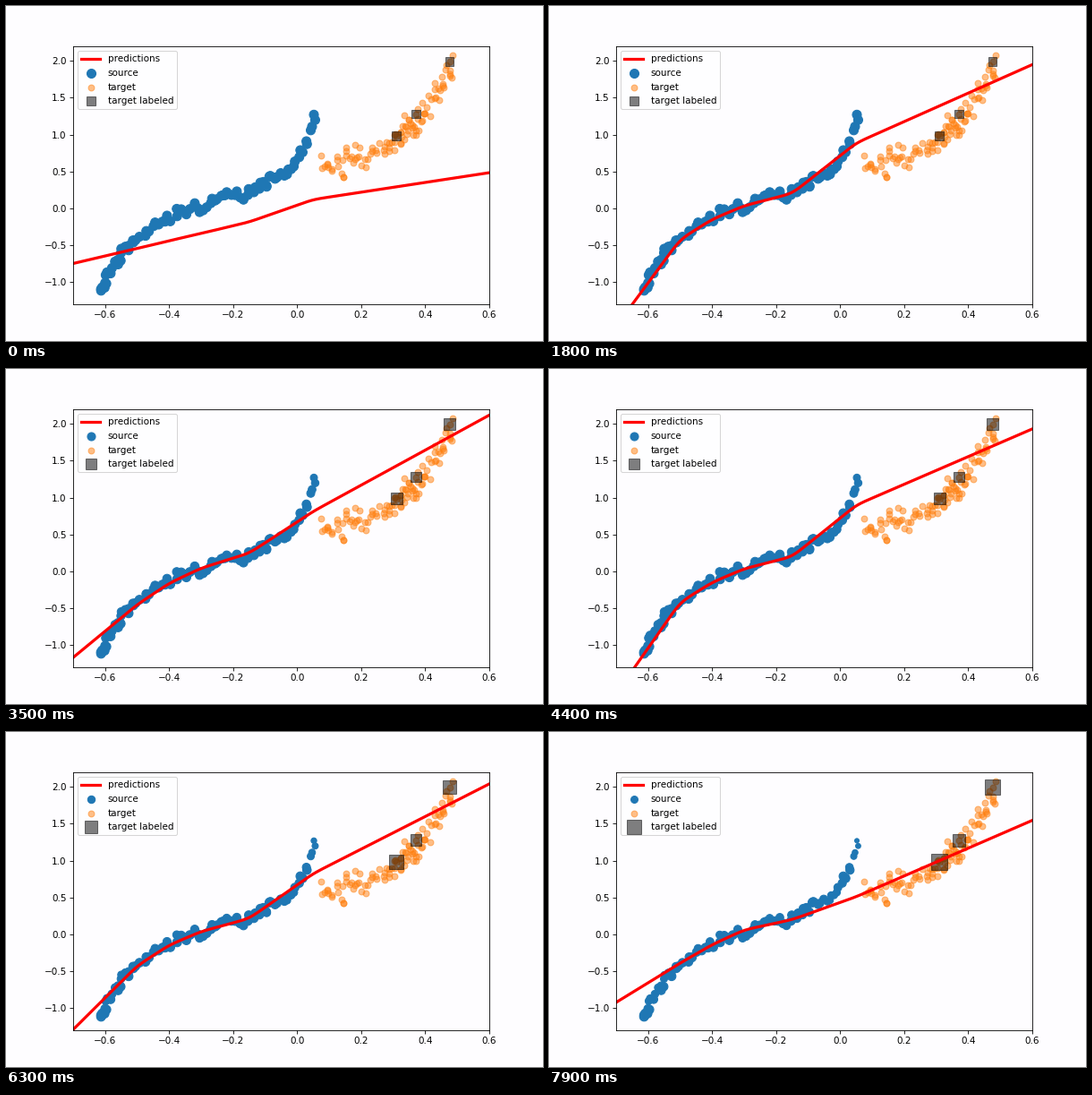
A matplotlib script for the animation above (8000 ms loop, 600 px wide and 374 px high).

```python
import numpy as np
import matplotlib.pyplot as plt
from matplotlib.animation import FuncAnimation

FRAMES, STAGE_LEN = 80, 25
PAPER = "#fefdff"
rng = np.random.default_rng(4)


def scatter_along(path, count, noise):
    """Points spread evenly over the sections of a path, with random offsets."""
    path = np.array(path)
    t = np.linspace(0, len(path) - 1, count)
    k = np.arange(len(path))
    points = np.column_stack([np.interp(t, k, col) for col in path.T])
    return points + rng.normal(0, 1, points.shape).clip(-1.8, 1.8) * noise


SOURCE = scatter_along(
    [(-.61, -1.11), (-.6, -1.07), (-.57, -.71), (-.54, -.57), (-.5, -.4), (-.44, -.25),
     (-.4, -.14), (-.34, -.01), (-.295, .01), (-.25, .13), (-.2, .18), (-.15, .19),
     (-.1, .35), (-.065, .42), (-.02, .53), (.02, .83), (.057, 1.24)],
    90, (.004, .04))

LABELED = np.array([(.310, .985), (.371, 1.28), (.476, 1.995)])
TARGET = np.vstack([LABELED, scatter_along(
    [(.075, .56), (.13, .58), (.17, .68), (.22, .74), (.28, .83), (.32, .98), (.345, 1.1),
     (.375, 1.18), (.41, 1.38), (.45, 1.68), (.488, 2.02)],
    100, (.006, .1))])

# Height of the fitted curve at its bends, for some steps of a training stage
BENDS = [-.8, -.5, -.4, -.3, -.15, .05, .7]
FITS = {
    0: [-.85, -.545, -.44, -.34, -.185, .12, .55],
    1: [-.47, -.305, -.25, -.2, -.12, .14, .865],
    4: [-1.19, -.39, -.14, .06, .2, .51, 1.735],
    6: [-1.48, -.54, -.23, .06, .35, .87, 2.545],
    11: [-1.54, -.43, -.145, .04, .22, .8, 2.31],
    19: [-2.28, -.42, -.15, .035, .2, .9, 2.12],
}

DX, PAD = .0025, 20
wide = np.arange(-.75, .6501, DX)
grid = wide[PAD:-PAD]
kernel = np.exp(-.5 * (np.arange(-PAD, PAD + 1) * DX / .018) ** 2)
kernel /= kernel.sum()


def fit_at(step):
    """Curve at a step of the stage: a broken line with softened corners."""
    heights = [np.interp(step, list(FITS), h) for h in zip(*FITS.values())]
    return np.convolve(np.interp(wide, BENDS, heights), kernel, "valid")


# Badly fitted source points lose weight, labeled targets gain it
error = np.abs(SOURCE[:, 1] - np.interp(SOURCE[:, 0], grid, fit_at(STAGE_LEN)))
gain = np.array([70, 32, 60])


def source_sizes(stage):
    return 93 * np.exp(-1.25 * stage * error)


def labeled_sizes(stage):
    return 85 + stage * gain


fig, ax = plt.subplots(figsize=(8, 4.98667), dpi=75, facecolor=PAPER)
ax.set(xlim=(-.7, .6), ylim=(-1.3, 2.2), facecolor=PAPER)
line, = ax.plot(grid, fit_at(0), "r", lw=3.1, label="predictions")
source = ax.scatter(*SOURCE.T, s=source_sizes(0), c="C0", label="source")
ax.scatter(*TARGET.T, s=44, c="C1", alpha=.5, label="target")
labeled = ax.scatter(*LABELED.T, s=labeled_sizes(0), c="k", marker="s", alpha=.5,
                     label="target labeled")


def update(i):
    stage, step = divmod(i, STAGE_LEN)
    line.set_ydata(fit_at(step))
    if step == 0:
        source.set_sizes(source_sizes(stage))
        labeled.set_sizes(labeled_sizes(stage))
        ax.legend(loc="upper left", labelspacing=.54)
    return line, source, labeled


anim = FuncAnimation(fig, update, frames=FRAMES, interval=100, init_func=lambda: update(0),
                     repeat=True, repeat_delay=0, blit=False)
plt.show()
```
